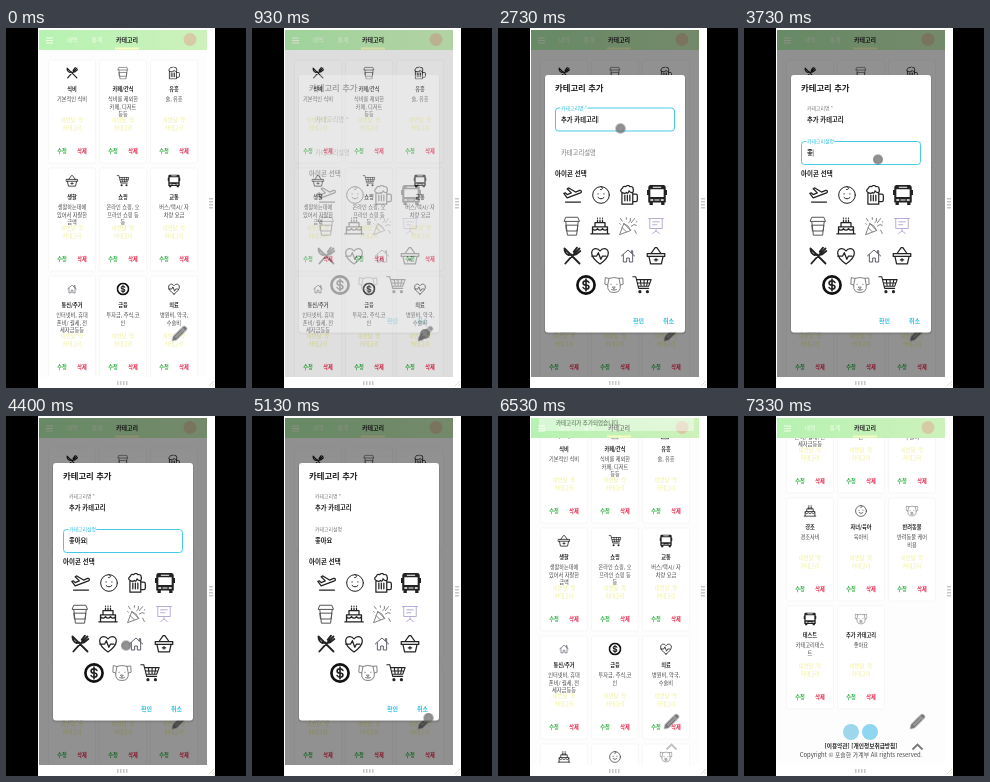
An HTML page for the animation above (7.39 s loop, 240x360 px).

```html
<!DOCTYPE html>
<html lang="ko">
<head>
<meta charset="utf-8">
<title>카테고리</title>
<style>
  html, body { margin: 0; width: 100%; height: 100%; overflow: hidden; background: #000; }
  svg { display: block; }
  #stage { width: 100vw; height: 100vh; }
  text { font: 500 5.2px "Noto Sans CJK KR", "Noto Sans CJK", "Noto Sans", sans-serif; fill: #444; }
  .mid { text-anchor: middle; }
  .bold { font-weight: 700; fill: #222; }
  .line { fill: none; stroke: #222; stroke-width: 1.5; stroke-linecap: round; stroke-linejoin: round; }
  .thin { stroke: #777; stroke-width: 1.1; }
  .chip { fill: #eeee94; }
  .edit { fill: #35b44a; font-weight: 700; }
  .del { fill: #e8254b; font-weight: 700; }
  .nav { fill: #f4ffe9; font-size: 5.6px; }
  .cyan { fill: #25bfe0; font-weight: 700; }
  .card { fill: #fff; stroke: #f1f1f1; stroke-width: .6; }
  .handle { stroke: #c8c8c8; stroke-width: 4; stroke-dasharray: 1.5 1.5; }

  #list, #dim, #modal, #toast, #top, #cursor { animation: 7390ms linear infinite; }
  #list { animation-name: scroll; }
  #dim, #modal { animation-name: dialog; }
  #toast { animation-name: toast; }
  #top { animation-name: top; }
  #cursor { animation-name: cursor; animation-timing-function: ease-in-out; }

  @keyframes scroll {
    0%, 85.9% { transform: translateY(0); animation-timing-function: ease-in-out; }
    97%, 100% { transform: translateY(-274px); }
  }
  @keyframes dialog {
    0%, 11.8% { opacity: 0; }
    14.5%, 74% { opacity: 1; }
    75.8%, 100% { opacity: 0; }
  }
  @keyframes toast {
    0%, 75.5% { opacity: 0; transform: translateY(-34px); animation-timing-function: ease-out; }
    77.8%, 87% { opacity: 1; transform: translateY(0); }
    89.5%, 100% { opacity: 0; transform: translateY(-34px); }
  }
  @keyframes top {
    0%, 87% { opacity: 0; }
    90%, 100% { opacity: 1; }
  }
  @keyframes cursor {
    0%, 4% { transform: translate(150px, 280px); opacity: 0; }
    5.5% { transform: translate(152px, 284px); opacity: 1; }
    9.5%, 13% { transform: translate(173px, 306px); }
    20%, 38.5% { transform: translate(122.5px, 100.5px); }
    43.5%, 56.8% { transform: translate(134px, 131.5px); }
    60.9%, 64.3% { transform: translate(116px, 258px); }
    68.7%, 70.2% { transform: translate(176.5px, 302px); }
    73%, 83% { transform: translate(144px, 292px); opacity: 1; }
    85.5%, 100% { transform: translate(144px, 292px); opacity: 0; }
  }
</style>
</head>
<body>
<svg id="stage" viewBox="0 0 240 360">
  <defs>
    <linearGradient id="green">
      <stop offset="0" stop-color="#b6f2b2"/>
      <stop offset="1" stop-color="#cdf1bb"/>
    </linearGradient>
    <clipPath id="view"><path d="M33 2h168v347H33z"/></clipPath>

    <symbol id="plane" viewBox="0 0 24 24"><path class="line" d="M3 20.500h18M1 10l4 5.500 16-6c2-1 1-3.500-1-3l-5 2-8-5-2 1 5 5-5 2-2-2z"/></symbol>
    <symbol id="baby" viewBox="0 0 24 24"><g class="line" style="stroke-width:1.2"><circle cx="12" cy="12" r="10"/><path d="M12 2c3 1 2 4-.5 3.500M8.500 10.500v.5M15.500 10.500v.5M8.500 15q3.500 3.500 7 0"/></g></symbol>
    <symbol id="beer" viewBox="0 0 24 24"><path class="line" d="M3.500 9v14h13V9M16.500 11H20q2 0 2 2v5q0 2-2 2h-3.500M7 12v7M10 12v7M13 12v7M4 9q-4-2 0-5 1-3 4-2 3-3 5 0 4-1 4 3 1 4-2 4-2 0-3-2-1 4-3 2-2 2-5 0z"/></symbol>
    <symbol id="bus" viewBox="0 0 24 24"><path fill="#222" d="M4 0h16q2.500 0 2.500 3v18H21v3h-4v-3H7v3H3v-3H1.500V3q0-3 2.500-3zM0 6h2v6H0zM22 6h2v6h-2z"/><path fill="#fff" d="M4 5h16v9.500H4zM7 2h10v1.200H7zM4 17h3.500v2H4zM16.500 17H20v2h-3.500zM9 17.500h6v1.200H9z"/></symbol>
    <symbol id="cup" viewBox="0 0 24 24"><path class="line" style="stroke-width:1.200;stroke:#555" d="M5 1.500h14l2 5H3zM4.500 6.500l2 16.500h11l2-16.500M5 11h14l-.8 7H5.800z"/></symbol>
    <symbol id="cake" viewBox="0 0 24 24"><path class="line" d="M1 21.500h22M3 21v-8h18v8M6 13V8h12v5M3 15q3 4 6 0 3 4 6 0 3 4 6 0M9 8V5M12 8V5M15 8V5M9 2.500v.3M12 2.500v.3M15 2.500v.3"/></symbol>
    <symbol id="party" viewBox="0 0 24 24"><path class="line thin" d="M2 22L7 9l8 8zM5 14l5 5M7 9q6 2 8 8M13 8q3-1 2-5M16 12q3-3 6-1M20 3l-4 5M3 3l2 3M20 17l2 4M10 2v2M22 7h.5M2 9l1 1"/></symbol>
    <symbol id="board" viewBox="0 0 24 24"><path class="line thin" style="stroke:#b3a5d6" d="M3 3h18M4.500 3v12h15V3M12 15v3M8 21l4-3 4 3M8 7h8M8 10.500h5"/></symbol>
    <symbol id="fork" viewBox="0 0 24 24"><path class="line" style="stroke-width:2.200" d="M3 3l18 18M3 3q0 6 5 8l3-1M21 3l-8 8-9 10M18 2l-4 5M22 6l-5 4-4 1"/></symbol>
    <symbol id="heart" viewBox="0 0 24 24"><path class="line" d="M12 21.500C-3 11 2 3 7 3q3 0 5 3 2-3 5-3c5 0 10 8-5 18.500zM2 12h6l2-4 3 8 2-4h4"/></symbol>
    <symbol id="house" viewBox="-3 -3 30 30"><path class="line thin" style="stroke:#555060;stroke-width:1.4" d="M2 12L12 3l10 9M5 10v11h5v-6h4v6h5V10M17 7V4h2v5"/></symbol>
    <symbol id="basket" viewBox="0 0 24 24"><path class="line" d="M1.500 9h21v3.500h-21zM3.500 12.500l2 9h13l2-9M6 9l5-7h2l5 7M10 16.500h4M12 15v3"/></symbol>
    <symbol id="dollar" viewBox="0 0 24 24"><circle cx="12" cy="12" r="10.300" fill="none" stroke="#111" stroke-width="3.200"/><path class="line" style="stroke-width:2" d="M15.500 9q-1-2-3.500-2-3.500 0-3.500 2.500T12 12t3.500 2.500T12 17q-2.500 0-3.500-2M12 5v14"/></symbol>
    <symbol id="dog" viewBox="0 0 24 24"><path class="line thin" d="M6 4q6-2 12 0l4.500-.5L23 11l-3.500 1q1 9-7.500 9t-7.500-9L1 11l.5-7.500zM6 4l-1.500 8M18 4l1.500 8M8.500 11v.5M15.500 11v.5M10.500 14.500h3L12 16zM12 16v1.500M9 17.500q3 2 6 0"/></symbol>
    <symbol id="cart" viewBox="0 0 24 24"><path class="line" style="stroke-width:1.300" d="M1 2h3.500l3.500 14h12M5.500 5.500H23l-3 8H7.500M6.500 9.500h15M10 5.500l1 8M14.500 5.500v8M19 5.500l-1.500 8"/><circle cx="9.500" cy="20" r="1.900" fill="#222"/><circle cx="18.500" cy="20" r="1.900" fill="#222"/></symbol>
  </defs>

  <path fill="#fff" d="M32 0h177v360H32z"/>
  <path class="handle" d="M111 355h12M205 170v12"/>
  <path stroke="#d8d8b8" stroke-width=".8" d="M203 358l5-5M206 358l2-2"/>

  <g clip-path="url(#view)">
    <path fill="#fdfdfd" d="M33 2h168v347H33z"/>
    <g id="list">
      <circle cx="107" cy="590" r="8" fill="#9ed7ec"/>
      <circle cx="126" cy="590" r="8" fill="#8fd6f3"/>
      <text class="mid bold" x="117" y="604" dy=".36em" style="font-size:5.700px">[이용약관] [개인정보취급방침]</text>
      <text class="mid" x="117" y="613" dy=".36em" style="font-size:5.900px">Copyright © 포슬한 가계부 All rights reserved.</text>
    </g>

    <path fill="url(#green)" d="M33 2h168v20H33z"/>
    <path stroke="#f4ffe9" d="M40 10h7M40 12.500h7M40 15h7"/>
    <text class="nav mid" x="66" y="12" dy=".36em">내역</text>
    <text class="nav mid" x="91" y="12" dy=".36em">통계</text>
    <text class="mid bold" x="121" y="12" dy=".36em" style="font-size:6px">카테고리</text>
    <path fill="#f7fbc0" d="M109 19.500h24v2h-24z"/>
    <circle cx="184" cy="11.500" r="6.500" fill="#d6cba6"/>

    <g transform="translate(173 306) rotate(-45)">
      <path fill="#777" d="M-10 0l4-2.500H8q2 0 2 2.500t-2 2.500H-6z"/>
      <path stroke="#ccc" stroke-width=".8" d="M-5 0H5M6 -2.500v5"/>
    </g>
    <path id="top" d="M168.500 333.500l5-5 5 5" fill="none" stroke="#777" stroke-width="1.800"/>

    <g id="toast">
      <rect x="41" y="6" width="155" height="28" rx="2" fill="#fff"/>
      <g fill="none" stroke="#7ccf72" stroke-width=".9"><circle cx="48" cy="15" r="3.500"/><path d="M46.300 15l1.300 1.400 2.300-2.800"/></g>
      <text class="bold" x="58" y="15" dy=".36em" style="font-size:6.400px">성공</text>
      <text class="bold" x="58" y="26" dy=".36em" style="font-size:5.500px">카테고리가 추가되었습니다.</text>
      <path stroke="#555" stroke-width=".9" d="M184 14.500l4.500 4.500m0-4.500l-4.500 4.500"/>
    </g>
    <path id="dim" fill="#000" fill-opacity=".43" d="M33 2h168v347H33z"/>
  </g>

  <g id="modal">
    <rect x="46" y="47.500" width="142" height="259" rx="4" fill="#000" opacity=".1"/>
    <rect x="47" y="47" width="140" height="257.500" rx="3" fill="#fff"/>
    <text class="bold" x="57" y="60" dy=".36em" style="font-size:8.400px">카테고리 추가</text>
    <text class="bold" x="57" y="145.500" dy=".36em" style="font-size:6.500px">아이콘 선택</text>
    <text class="mid cyan" x="140.500" y="293" dy=".36em" style="font-size:6px">확인</text>
    <text class="mid cyan" x="170.500" y="293" dy=".36em" style="font-size:6px">취소</text>
  </g>

  <g id="cursor"><circle r="5" fill="#666" fill-opacity=".75"/><circle r="2.500" fill="#999" fill-opacity=".5"/></g>
</svg>

<script>
const LOOP = 7390;
const $ = id => document.getElementById(id);

function add(parent, tag, attrs, content = '') {
  const el = document.createElementNS('http://www.w3.org/2000/svg', tag);
  for (const key in attrs) el.setAttribute(key, attrs[key]);
  el.textContent = content;
  return parent.appendChild(el);
}
const write = (parent, x, y, content, cls) =>
  add(parent, 'text', { x, y, dy: '.36em', class: cls }, content);
const icon = (parent, name, x, y, size) =>
  add(parent, 'use', { href: '#' + name, x: x - size / 2, y: y - size / 2, width: size, height: size });

const cards = [
  ['fork', '식비', '기본적인 식비'],
  ['cup', '카페/간식', '식비를 제외한', '카페, 디저트', '등등'],
  ['beer', '유흥', '술, 유흥'],
  ['basket', '생활', '생활하는데에', '있어서 자잘한', '금액'],
  ['cart', '쇼핑', '온라인 쇼핑, 오', '프라인 쇼핑 등', '등'],
  ['bus', '교통', '버스/택시/ 자', '차량 요금'],
  ['house', '통신/주거', '인터넷비, 휴대', '폰비/ 월세, 전', '세자금등등'],
  ['dollar', '금융', '투자금, 주식,코', '인'],
  ['heart', '의료', '병원비, 약국,', '수술비'],
  ['cake', '경조', '경조사비'],
  ['baby', '자녀/육아', '육아비'],
  ['dog', '반려동물', '반려동물 케어', '비용'],
  ['bus', '테스트', '카테고리테스', '트'],
  ['dog', '추가 카테고리', '좋아요']
];
cards.forEach(([name, title, ...lines], i) => {
  const list = $('list'), x = 66 + i % 3 * 51, y = 45 + Math.floor(i / 3) * 108;
  add(list, 'rect', { x: x - 23.5, y: y - 13, width: 47, height: 103, rx: 2, class: 'card' });
  icon(list, name, x, y, 13);
  write(list, x, y + 16, title, 'mid bold');
  lines.forEach((line, n) => write(list, x, y + 26 + n * 7.7, line, 'mid'));
  write(list, x, y + 47.5, '이번달: 약', 'mid chip');
  write(list, x, y + 55.5, '카테고리', 'mid chip');
  write(list, x - 10, y + 78, '수정', 'mid edit');
  write(list, x + 10, y + 78, '삭제', 'mid del');
});

const choices = [
  [75, 167, 'plane baby beer bus'],
  [74, 198, 'cup cake party board'],
  [74, 228, 'fork heart house basket'],
  [88, 257, 'dollar dog cart']
];
for (const [x, y, names] of choices)
  names.split(' ').forEach((name, i) => icon($('modal'), name, x + i * 28, y, 20));

// Each entry of keys is the text after one key press.
function makeField(top, name, focus, blur, start, step, keys) {
  const g = $('modal'), mid = top + 11.5;
  const box = add(g, 'rect', { x: 57.5, y: top, width: 119, height: 23, rx: 3, fill: 'none', stroke: '#45c9e6', 'stroke-width': 1 });
  const label = write(g, 63, mid, name);
  label.style.cssText = 'paint-order:stroke;stroke:#fff;stroke-width:2px';
  const value = write(g, 63, mid, '', 'bold');
  value.style.fontSize = '6.3px';
  const caret = add(g, 'path', { stroke: '#444', 'stroke-width': .6 });
  return t => {
    const focused = t >= focus && t < blur;
    const count = Math.floor((t - start) / step);
    const text = count < 0 ? '' : keys[Math.min(count, keys.length - 1)];
    const floating = focused || text;
    box.style.visibility = focused ? 'visible' : 'hidden';
    label.setAttribute('y', floating ? top : mid);
    label.style.fontSize = floating ? '4.9px' : '6.3px';
    label.style.fill = focused ? '#25bfe0' : '#777';
    value.textContent = text;
    const x = 63.4 + (text ? value.getComputedTextLength() : 0);
    caret.setAttribute('d', `M${x} ${mid - 3.5}v7`);
    caret.style.visibility = focused && (t - focus) % 1060 < 530 ? 'visible' : 'hidden';
  };
}
const fields = [
  makeField(80, '카테고리명 *', 1530, 3230, 1790, 67,
    ['ㅊ', '추', '축', '추가', '추가 ', '추가 ㅋ', '추가 카', '추가 캍', '추가 카테', '추가 카텍', '추가 카테고', '추가 카테골', '추가 카테고리']),
  makeField(113.5, '카테고리설명', 3230, 4560, 3560, 80,
    ['ㅈ', '조', '좋', '좋ㅇ', '좋아', '좋앙', '좋아요'])
];

function draw(now) {
  const t = now % LOOP;
  fields.forEach(update => update(t));
  requestAnimationFrame(() => draw(performance.now()));
}
draw(performance.now());
</script>
</body>
</html>
```
